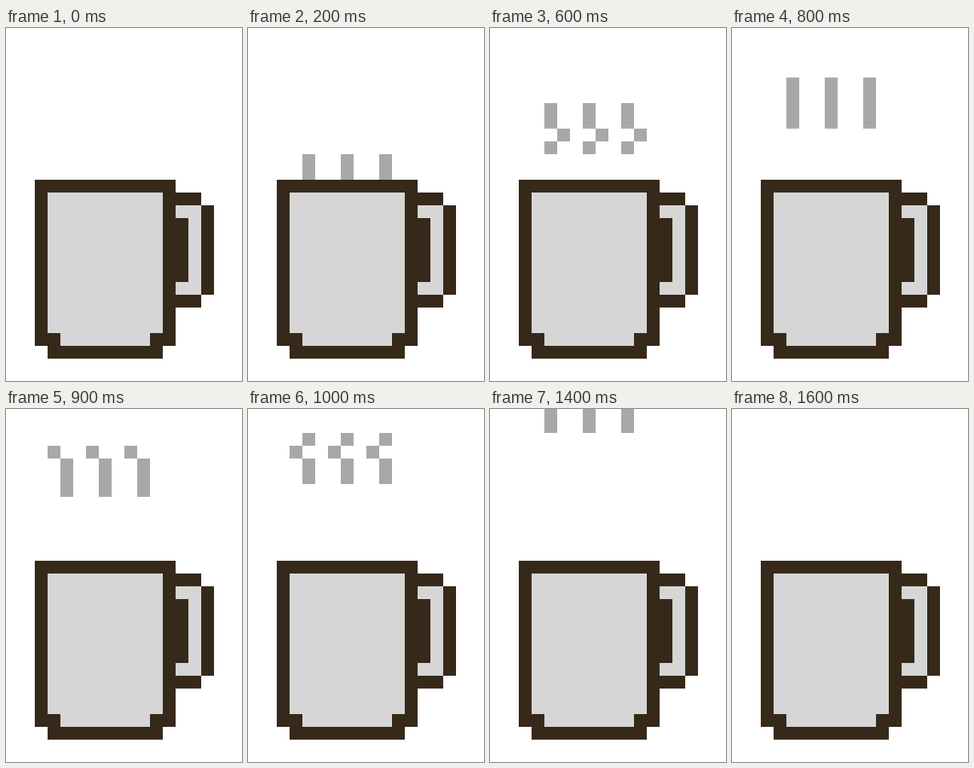
These frames come from a looping animation (295x442 px, 1700 ms). An HTML page with a canvas:

```html
<!DOCTYPE html>
<html lang="en">
<head>
<meta charset="utf-8">
<title>Steaming mug</title>
<style>
  html, body { margin: 0; width: 100%; height: 100%; overflow: hidden; background: #fff; }
  canvas { display: block; }
</style>
</head>
<body>
<canvas id="stage" width="295" height="442"></canvas>
<script>
const ctx = document.getElementById('stage').getContext('2d');
const CELL = 16, LEFT = 4, TOP = -2;
const STEP = 100, LOOP = 1700;
const DARK = '#36291a', LIGHT = '#d6d6d6', STEAM = '#a8a8a8';

function block(color, col, row, cols = 1, rows = 1) {
  ctx.fillStyle = color;
  ctx.fillRect(LEFT + col * CELL, TOP + row * CELL, cols * CELL, rows * CELL);
}

function drawMug() {
  // Body
  block(DARK, 2, 12, 11, 13);
  block(DARK, 3, 25, 9);
  block(LIGHT, 3, 13, 9, 11);
  block(LIGHT, 4, 24, 7);
  // Handle
  block(DARK, 13, 13, 2, 9);
  block(DARK, 15, 14, 1, 7);
  block(LIGHT, 13, 14, 2, 7);
  block(DARK, 13, 15, 1, 5);
}

// Each wisp climbs a fixed path with one kink to the right and one to the left.
function drawSteam(step) {
  if (step === 0) return;
  const head = 12 - step;
  const tail = Math.min(head + 3, step < 4 ? 11 : 10);
  for (let row = Math.max(head, 0); row <= tail; row++) {
    const kink = row === 8 ? 1 : row === 3 ? -1 : 0;
    for (const col of [4, 7, 10]) block(STEAM, col + kink, row);
  }
}

function render(now) {
  ctx.fillStyle = '#fff';
  ctx.fillRect(0, 0, 295, 442);
  drawMug();
  drawSteam(Math.floor((now % LOOP) / STEP));
}

let start;
function tick(now) {
  start ??= now;
  render(now - start);
  requestAnimationFrame(tick);
}
render(0);
requestAnimationFrame(tick);
</script>
</body>
</html>
```
